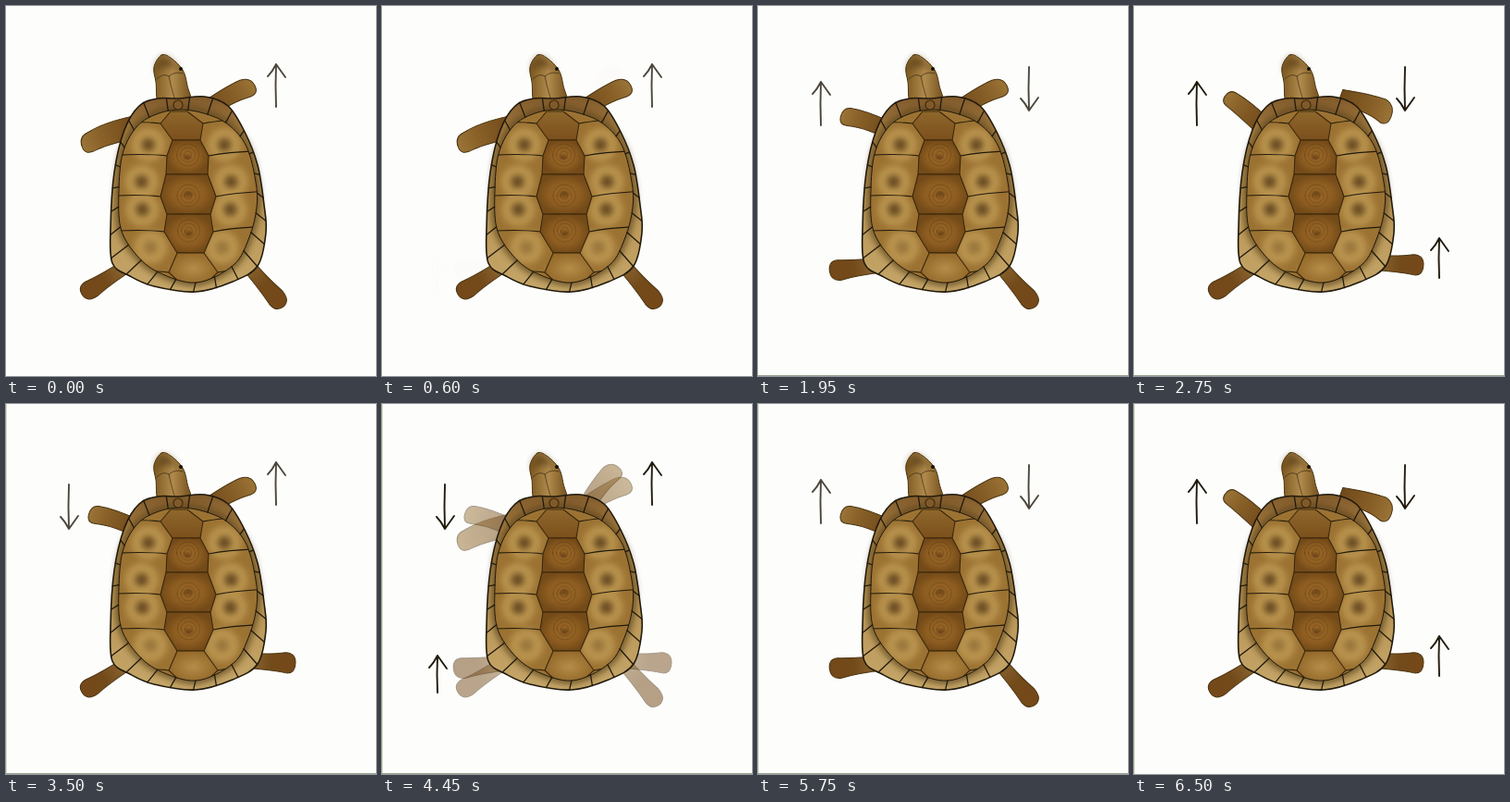
An HTML page for the animation above (6550 ms loop, 400 by 400 pixels).

```html
<!DOCTYPE html>
<html lang="en">
<head>
<meta charset="utf-8">
<title>Walking tortoise</title>
<style>
  html, body { margin: 0; width: 100%; height: 100%; overflow: hidden; background: #fdfdfb; }
  svg { display: block; width: 100vw; height: 100vh; }
  path { stroke-linecap: round; stroke-linejoin: round; }
  .ink { fill: none; stroke: #211a0c; }
  .limb { stroke: #4a3412; stroke-width: 1; }
  .scute { stroke: #3a270b; stroke-width: 1.1; }
  .soft { filter: url(#soft); }
</style>
</head>
<body>
<svg viewBox="0 0 400 400">
  <defs>
    <linearGradient id="front">
      <stop offset="0" stop-color="#70491a"/>
      <stop offset=".6" stop-color="#875f27"/>
      <stop offset="1" stop-color="#9b7437"/>
    </linearGradient>
    <linearGradient id="hind">
      <stop offset="0" stop-color="#94703a"/>
      <stop offset=".55" stop-color="#734a1a"/>
      <stop offset="1" stop-color="#754818"/>
    </linearGradient>
    <linearGradient id="skin">
      <stop offset="0" stop-color="#7d5a22"/>
      <stop offset=".5" stop-color="#b08a4c"/>
      <stop offset="1" stop-color="#73501c"/>
    </linearGradient>
    <linearGradient id="rim" x1="0" y1="0" x2="0" y2="1">
      <stop offset="0" stop-color="#80592a"/>
      <stop offset=".25" stop-color="#b08a4a"/>
      <stop offset="1" stop-color="#c5a668"/>
    </linearGradient>
    <linearGradient id="nape" x1="0" y1="0" x2="0" y2="1">
      <stop offset="0" stop-color="#8f672c"/>
      <stop offset="1" stop-color="#7b4f1b"/>
    </linearGradient>
    <radialGradient id="spine">
      <stop offset="0" stop-color="#6f4518"/>
      <stop offset=".25" stop-color="#966425"/>
      <stop offset=".6" stop-color="#8c5c20"/>
      <stop offset="1" stop-color="#734a18"/>
    </radialGradient>
    <radialGradient id="tail">
      <stop offset="0" stop-color="#b58d48"/>
      <stop offset="1" stop-color="#94692b"/>
    </radialGradient>
    <filter id="soft" x="-60%" y="-60%" width="220%" height="220%"><feGaussianBlur stdDeviation="3.5"/></filter>
    <clipPath id="inside"><path id="clip"/></clipPath>
  </defs>
  <g id="limbs"></g>
  <g id="head"></g>
  <g id="shell"></g>
  <g id="scutes" clip-path="url(#inside)"></g>
  <g id="edges"></g>
  <g id="arrows"></g>
  <path id="left" d="M.5 0V400" stroke="#d8dcc0"/>
  <path id="bottom" d="M0 399.5H400" stroke="#98a390"/>
</svg>
<script>
const LOOP = 6550;
const $ = id => document.getElementById(id);

function add(parent, d, attrs) {
  const p = document.createElementNS('http://www.w3.org/2000/svg', 'path');
  p.setAttribute('d', d);
  for (const k in attrs) p.setAttribute(k, attrs[k]);
  return $(parent).appendChild(p);
}

// Closed smooth curve through the key points
function smooth(text) {
  const p = text.split(' ').map(s => s.split(',').map(Number));
  const n = p.length, at = i => p[(i + n) % n];
  let d = 'M' + p[0];
  for (let i = 0; i < n; i++) {
    const [a, b, c, e] = [at(i - 1), at(i), at(i + 1), at(i + 2)];
    const c1 = b.map((v, k) => v + (c[k] - a[k]) / 6);
    const c2 = c.map((v, k) => v - (e[k] - b[k]) / 6);
    d += `C${c1} ${c2} ${c}`;
  }
  return d + 'Z';
}

const circle = (x, y, r) => `M${x - r} ${y}a${r} ${r} 0 1 0 ${2 * r} 0a${r} ${r} 0 1 0 ${-2 * r} 0Z`;

const parts = {};

// A paddle from a shell joint: half-widths at joint and tip, bend to one side
function limb(name, x, y, angle, len, root, tip, bend, fill) {
  const d = `M-12 ${-root}Q${len * .4} ${bend - root} ${len * .75} ${bend / 2 - tip}
    Q${len} ${-tip} ${len} 0Q${len} ${tip} ${len * .8} ${tip + bend / 4}
    Q${len * .4} ${root + bend} -12 ${root}Z`;
  parts[name] = add('limbs', d, {
    class: 'limb', fill: `url(#${fill})`, transform: `translate(${x} ${y}) rotate(${angle})`
  });
}
limb('flBack', 132, 134, 160, 53, 12, 11, 5, 'front');
limb('flMid', 128, 130, 196, 40, 9, 10, 4, 'front');
limb('flFwd', 130, 122, 219, 40, 10, 9, 2, 'front');
limb('frMid', 227, 107, -27, 47, 9, 10, -4, 'front');
limb('frFwd', 227, 103, -51, 45, 9, 10, -4, 'front');
limb('frBack', 234, 103, 20, 47, 9, 12, -6, 'front');
limb('blBack', 126, 284, 147, 52, 7, 10, 0, 'hind');
limb('blFwd', 124, 281, 173, 47, 8, 11, 0, 'hind');
limb('brBack', 262, 281, 49, 58, 7, 10, 0, 'hind');
limb('brFwd', 268, 278, 3, 45, 8, 11, 0, 'hind');

// dir 1 points up, -1 down
function arrow(name, x, y, len, dir) {
  parts[name] = add('arrows', `M0 ${len}Q-1 ${len / 2} 0 0M-9 13Q-4 8 0 0Q5 7 10 14`, {
    class: 'ink', 'stroke-width': 1.9, transform: `translate(${x} ${y}) scale(1 ${dir})`
  });
}
arrow('frUp', 292, 63, 46, 1);
arrow('frDown', 293, 113, 47, -1);
arrow('flUp', 68, 82, 47, 1);
arrow('flDown', 68, 135, 48, -1);
arrow('blUp', 60, 272, 40, 1);
arrow('brUp', 330, 251, 43, 1);

// Head
add('head', smooth('168,53 160,66 162,82 167,108 199,108 196,86 191,69 178,56'), { class: 'limb', fill: 'url(#skin)' });
add('head', 'M163 62Q168 50 178 58L188 68Q172 62 162 72Z', { class: 'soft', fill: '#5a3d14', opacity: .7 });
add('head', 'M163 79Q170 72 176 76Q178 86 182 99M176 76Q183 70 191 73', { class: 'ink', 'stroke-width': .8, opacity: .7 });
add('head', circle(189, 68, 2), { fill: '#171205' });

// Shell rim with seams running from the outer to the inner ring
const outer = smooth('186,100 215,98 240,108 258,136 272,172 279,215 281,245 272,281 245,298 205,309 160,303 134,292 115,278 113,240 117,180 128,134 144,108 164,100');
const inner = smooth('186,112 214,116 240,128 260,152 270,190 271,218 263,250 246,280 206,299 165,288 140,268 124,240 122,200 126,160 140,132 160,118');
$('clip').setAttribute('d', inner);
const rim = add('shell', outer, { fill: 'url(#rim)' });
const ring = add('shell', inner, { class: 'soft', fill: '#a47b3c', stroke: '#3b290c', 'stroke-width': 6, 'stroke-opacity': .75 });

const SEAMS = 25;
const along = (path, f) => {
  const { x, y } = path.getPointAtLength(path.getTotalLength() * f);
  return `${x} ${y}`;
};
for (let i = 0; i < SEAMS; i++) {
  const f = (i + .5) / SEAMS;
  add('edges', `M${along(rim, f)}L${along(ring, f)}`, { class: 'ink', 'stroke-width': 1.3 });
}

// Side scutes: pale patches with dark centres, mirrored about the spine
add('scutes', inner, { fill: '#9b7232' });
[150, 190, 220, 261].forEach((y, i) => {
  const reach = 49 - 4 * (i - 1.4) ** 2;
  for (const x of [195 - reach, 195 + reach]) {
    add('scutes', circle(x, y, 18), { class: 'soft', fill: '#ba9450' });
    add('scutes', circle(x, y, 7), { class: 'soft', fill: '#573a14', opacity: i < 3 ? .85 : .35 });
  }
});

// Spine: y, left, right; even rows join two scutes, odd rows are their corners
const rows = [
  [114, 178, 196], [127, 167, 213], [145, 180, 210], [162, 174, 219],
  [182, 173, 218], [206, 167, 227], [225, 174, 221], [244, 171, 224],
  [267, 185, 214], [288, 176, 229], [301, 190, 215]
];
['nape', 'spine', 'spine', 'spine', 'tail'].forEach((fill, i) => {
  const [a, b, c] = rows.slice(2 * i, 2 * i + 3);
  const [y, l, r] = b;
  add('scutes', `M${l} ${y}Q${l - 25} ${y - 3} 105 ${y}M${r} ${y}Q${r + 25} ${y - 5} 290 ${y - 6}`, { class: 'ink', 'stroke-width': 1.1 });
  add('scutes', `M${a[1]} ${a[0]}L${a[2]} ${a[0]}L${r} ${y}L${c[2]} ${c[0]}L${c[1]} ${c[0]}L${l} ${y}Z`,
    { class: 'scute', fill: `url(#${fill})` });
  if (fill === 'spine') {
    for (let k = 4; k < 16; k += 4)
      add('scutes', circle((l + r) / 2, y - 1, k), { class: 'ink', 'stroke-width': .9, opacity: .22 });
  }
});

add('edges', inner, { class: 'ink', 'stroke-width': 1 });
add('edges', outer, { class: 'ink', 'stroke-width': 1.6 });
add('edges', circle(186, 107, 5), { class: 'scute', fill: '#80592a' });

// Gait: limbs shown, arrows shown, arrow strength
const gait = {
  rest: ['flBack frMid blBack brBack', 'frUp', .8],
  right: ['flBack frFwd blFwd brBack', 'frUp blUp', 1],
  rightAgain: ['flBack frFwd blFwd brBack', 'flDown frUp blUp', 1],
  toLeft: ['flMid frMid blFwd brBack', 'flUp frDown', .8],
  left: ['flFwd frBack blBack brFwd', 'flUp frDown brUp', 1],
  toRight: ['flMid frMid blBack brFwd', 'flDown frUp', .8]
};
const steps = [
  [0, 'rest'], [600, 'right'], [1470, 'toLeft'], [2070, 'left'],
  [3000, 'toRight'], [4250, 'rightAgain'], [5100, 'toLeft'], [5870, 'left']
].map(([start, pose]) => {
  const [limbs, arrows, ink] = gait[pose];
  const alpha = {};
  for (const name of limbs.split(' ')) alpha[name] = 1;
  for (const name of arrows.split(' ')) alpha[name] = ink;
  return { start, alpha };
});
const FADE = 390;

function draw(now) {
  const t = now % LOOP;
  const i = steps.findLastIndex(step => t >= step.start);
  const cur = steps[i], prev = steps[Math.max(0, i - 1)];
  const mix = Math.min(1, (t - cur.start) / FADE);
  for (const name in parts) {
    const isArrow = /Up|Down/.test(name);
    const k = isArrow ? Math.min(1, mix * 2.5) : mix;
    const a = prev.alpha[name] || 0, b = cur.alpha[name] || 0;
    parts[name].setAttribute('opacity', a + (b - a) * k);
  }
  $('left').setAttribute('opacity', t >= 2850 ? 1 : 0);
  $('bottom').setAttribute('opacity', t >= 1050 && t < 6300 ? 1 : 0);
}

const begin = performance.now();
function tick() {
  draw(performance.now() - begin);
  requestAnimationFrame(tick);
}
tick();
</script>
</body>
</html>
```
